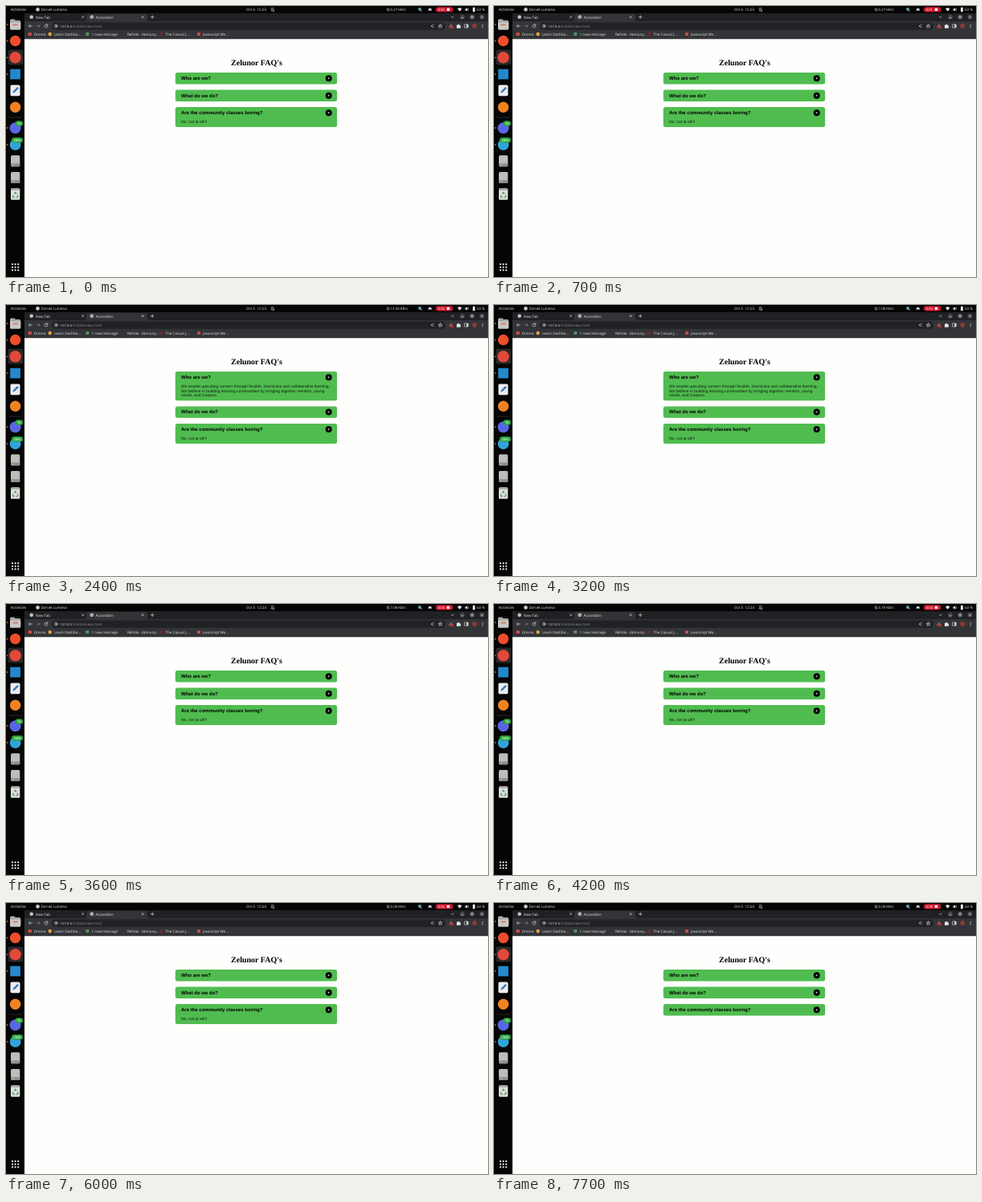
These frames come from a looping animation (600 by 338 pixels, 8 s). An HTML page:

```html
<!DOCTYPE html>
<html lang="en">
<head>
<meta charset="utf-8">
<title>Accordion</title>
<style>
  html, body { margin: 0; width: 100%; height: 100%; overflow: hidden; background: #fefefc; }
  svg { display: block; width: 600px; height: 338px; }
  text { font: 4.55px "Open Sans", "Noto Sans", sans-serif; fill: #e4e5e8; white-space: pre; text-rendering: geometricPrecision; }
  .line { fill: none; stroke: #d4d5d8; stroke-width: .7; stroke-linecap: round; stroke-linejoin: round; }
  .dim { stroke: #808185; }
  .badge { font-size: 4px; font-weight: 600; fill: #fff; text-anchor: middle; }
  .title { font: bold 10px "Liberation Serif", serif; fill: #000; text-anchor: middle; }
  .head { font: bold 6px "Liberation Sans", sans-serif; fill: #000; }
  .body { font: 5px "Liberation Sans", sans-serif; fill: #0b200b; }
</style>
</head>
<body>
<svg viewBox="0 0 600 338">
  <rect width="600" height="338" fill="#fefefc"/>

  <!-- browser frame -->
  <rect x="23" y="9" width="577" height="11" fill="#202124"/>
  <path d="M23 19H98q2 0 2-2V12q0-2 2-2h72q2 0 2 2v5q0 2 2 2H600V41.300H23z" fill="#333437"/>
  <rect x="57" y="20.500" width="490" height="9.300" rx="4.600" fill="#212225"/>
  <circle cx="31.700" cy="13.700" r="2.300" fill="#c3c4c7"/>
  <circle cx="106.700" cy="13.700" r="2.300" fill="#d4d5d8"/>
  <path class="line" stroke-width=".5" style="stroke:#55565a" d="M104.800 13h2l1 1.500M106 15.700v-1.200"/>
  <text x="37" y="15.500">New Tab</text>
  <text x="111.500" y="15.500" style="font-size:4.750px">Accordion</text>
  <path class="line" d="M94.500 12.600l2.200 2.200m0-2.200l-2.200 2.200M169.100 12.600l2.200 2.200m0-2.200l-2.200 2.200M180.300 13.700h3.800m-1.900-1.900v3.800M554.200 13.200l1.500 1.400 1.500-1.400"/>
  <g fill="#45464a"><circle cx="568" cy="13.800" r="3"/><circle cx="580.300" cy="13.800" r="3"/><circle cx="592.500" cy="13.800" r="3"/></g>
  <path class="line" d="M566.800 14.800h2.400M579.200 12.700h2.200v2.200h-2.200zM591.500 12.800l2 2m0-2l-2 2"/>

  <!-- toolbar -->
  <path class="line" d="M32.500 25h-4m1.700-1.700L28.500 25l1.700 1.700M51.700 23.900a2 2 0 1 0 .2 1.700M51.900 22.800v1.400h-1.400"/>
  <path class="line dim" d="M38 25h4m-1.700-1.700L42 25l-1.700 1.700"/>
  <g class="line" stroke-width=".5"><circle cx="62.300" cy="25" r="1.800"/><path d="M62.300 25v.9m0-1.900v.1"/></g>
  <text x="67.300" y="26.500" style="font-size:4.300px">127.0.0.1<tspan fill="#8d8f94">:5500/index.html</tspan></text>
  <path class="line" d="M532.300 23.400l-3.300 1.600 3.300 1.600"/>
  <path class="line" d="M540.600 22.700l.7 1.600 1.800.1-1.400 1.100.5 1.700-1.600-1-1.600 1 .5-1.700-1.400-1.100 1.800-.1z"/>
  <path d="M551 26.500l3-4 1.500 1.500-3.500 3z" fill="#8a6d70"/>
  <rect x="553.300" y="25" width="3.500" height="2.800" rx=".6" fill="#d32f3f"/>
  <path d="M561 23.700h1.300a.9.900 0 0 1 1.800 0h1.300v1.300a.9.900 0 0 1 0 1.800v.900h-4.400z" fill="#e4e5e8"/>
  <path class="line" d="M571.200 23h4v4h-4z"/><path d="M573.300 23h2v4h-2z" fill="#d4d5d8"/>
  <circle cx="583.200" cy="25" r="3" fill="#8b3a35"/>
  <g fill="#d4d5d8"><circle cx="593.200" cy="23.300" r=".6"/><circle cx="593.200" cy="25" r=".6"/><circle cx="593.200" cy="26.700" r=".6"/></g>

  <!-- bookmarks -->
  <rect x="27.700" y="33.300" width="4.200" height="3.600" fill="#dd4a40"/>
  <circle cx="54.700" cy="35.100" r="2.300" fill="#dca23c"/>
  <rect x="99.300" y="33" width="4" height="4" fill="#4f8f5b"/>
  <rect x="192.500" y="33.200" width="2.400" height="4" fill="#8e2430"/>
  <rect x="238" y="33.200" width="4" height="3.800" fill="#c94b43"/>
  <text x="35" y="36.800">Dremo</text>
  <text x="60" y="36.800">Learn Dashbo…</text>
  <text x="106.600" y="36.800">1 new message</text>
  <text x="151" y="36.800">RelVok - domuny…</text>
  <text x="198.500" y="36.800">The Casual J.…</text>
  <text x="245" y="36.800">Javascript We…</text>

  <!-- system bar and dock -->
  <path d="M0 0H600V9H23V338H0z" fill="#050505"/>
  <text x="5.800" y="6.200" style="font-size:4.700px">Activities</text>
  <circle cx="39.500" cy="4.400" r="2.300" fill="#c9cacb"/>
  <text x="43.500" y="6.200">Dorvel Lumena</text>
  <text id="clock" x="299" y="6.200"></text>
  <path class="line" d="M330.200 5.800h3.600q-.6-.6-.6-2.200a1.200 1.200 0 0 0-2.400 0q0 1.600-.6 2.200M331.700 6.900h.6M330 2.300l4 4.500" style="stroke-width:.5"/>
  <path class="line" d="M474.800 6.200V2.800l-.8.900M476.400 2.800v3.400l.8-.9" style="stroke-width:.6"/>
  <text id="speed" x="478.500" y="6.200" style="font-size:4.400px"></text>
  <circle cx="515" cy="4" r="2" fill="#5b9fac"/><path d="M516 5l1.700 1.600" class="line"/>
  <path d="M525.500 6.500l.8-3.500h3l.8 3.500-1.300-1h-2z" fill="#d4d5d8"/>
  <rect x="535" y="1.200" width="21.300" height="6.300" rx="3.100" fill="#cf1930"/>
  <text id="timer" x="537.700" y="5.900" style="font-size:4.200px;fill:#fff"></text>
  <rect x="548.800" y="2.700" width="3.400" height="3.400" rx=".4" fill="#fff"/>
  <path d="M562 3.500q2.700-2.300 5.400 0l-2.700 3.300z" fill="#e4e5e8"/>
  <path d="M571.500 3.600h1.200l1.500-1.400v4.600l-1.500-1.400h-1.200z" fill="#e4e5e8"/><path class="line" d="M575.300 3.200q.9 1.300 0 2.600"/>
  <path d="M581 2.200h.7v-.6h1.500v.6h.7v5H581z" fill="#e4e5e8"/>
  <text x="586" y="6.200">63 %</text>

  <rect x="2.500" y="54.500" width="18.500" height="19" rx="3" fill="#292929"/>
  <g fill="#e0562c"><circle cx="1.700" cy="23" r=".9"/><circle cx="1.700" cy="43.500" r=".9"/><circle cx="1.700" cy="64.300" r=".9"/><circle cx="1.700" cy="85" r=".9"/><circle cx="1.700" cy="152" r=".9"/><circle cx="1.700" cy="173" r=".9"/></g>
  <path d="M5 18q0-1.500 1.500-1.500h4l1.200 1.500h5q1.500 0 1.500 1.500V28q0 1.500-1.500 1.500H6.500Q5 29.500 5 28z" fill="#a9a9a7"/>
  <path d="M5 20.500h13.200V28q0 1.500-1.500 1.500H6.500Q5 29.500 5 28z" fill="#c8c8c5"/>
  <path d="M8.500 23.500h6.300" stroke="#d96a5b" stroke-width="1.500"/>
  <circle cx="11.600" cy="43.500" r="6.700" fill="#ee4d2b"/>
  <circle cx="11.600" cy="64.300" r="7.200" fill="#e3493b"/>
  <rect x="5.200" y="78.700" width="12.700" height="12.700" fill="#2489cc"/>
  <rect x="5.500" y="98.500" width="12" height="13.700" rx="1.600" fill="#eeeef0"/>
  <path d="M8.300 108.500l.8-2.500 5-5 1.700 1.700-5 5z" fill="#3878c4"/>
  <circle cx="11.600" cy="126.300" r="6.700" fill="#f08321"/>
  <path d="M4 139h15.500" stroke="#3c3c3c" stroke-width=".6"/>
  <circle cx="11.600" cy="152.300" r="7" fill="#5966e3"/>
  <circle cx="11.600" cy="173" r="6.900" fill="#30a3db"/>
  <rect x="11.500" y="143.200" width="9.500" height="6.600" rx="3.300" fill="#27a63a"/>
  <rect x="7" y="164" width="14" height="6.600" rx="3.300" fill="#27a63a"/>
  <text class="badge" x="16.200" y="148">76</text>
  <text class="badge" x="14" y="168.800">2935</text>
  <g id="drive">
    <rect x="6" y="186.300" width="11.300" height="14" rx="1.500" fill="#bcbcba"/>
    <path d="M6 196.500h11.300v2.300q0 1.500-1.500 1.500H7.500q-1.500 0-1.500-1.500z" fill="#8d8d8b"/>
    <path d="M8 198.400h2" stroke="#d8d8d5" stroke-width=".7"/>
  </g>
  <use href="#drive" y="20.700"/>
  <rect x="6" y="227.500" width="11.300" height="14.200" rx="1.500" fill="#dededb"/>
  <path d="M6 229q0-1.500 1.500-1.500h8.300q1.500 0 1.500 1.500v1H6z" fill="#aeb0ad"/>
  <path d="M10.400 234.300l1.300-1.800 1.300 1.800M14 235.800l.9 1.700-1 1.200h-1.500M10.900 238.700H9.300l-.9-1.300.9-1.500" fill="none" stroke="#389657" stroke-width="1.100"/>
  <g id="apps" fill="#f0f0f0"></g>

  <!-- page -->
  <text class="title" x="312" y="73.600">Zelunor FAQ's</text>
  <g id="accordion"></g>
</svg>
<script>
const LOOP = 8000, LINE = 5.625, CLOSED = 14.4, PITCH = 21.5, TOP = 83;
const $ = id => document.getElementById(id);

const panels = [
  { title: "Who are we?", open: t => t >= 2400 && t < 3600, lines: [
    "We enable upscaling careers through flexible, interactive and collaborative learning.",
    "We believe in building learning communities by bringing together mentors, young",
    "minds, and creators."] },
  { title: "What do we do?", open: t => t >= 4800 && t < 6000, lines: [
    "Building learning communities with Our Affordable & Competent Courses"] },
  { title: "Are the community classes boring?", open: t => t < 7200, lines: ["No, not at all!!!"] }
];

const speeds = [[0, "0.27"], [1200, "13.58"], [3200, "7.08"], [4200, "5.70"], [5200, "0.00"]];

$("accordion").innerHTML = panels.map(({ title, lines }) => `<g>
  <rect x="210.800" width="201.300" rx="2.500" fill="#50bc50"/>
  <text class="head" x="218" y="9.100">${title}</text>
  <circle cx="401.700" cy="7.200" r="4" fill="#000"/>
  <path d="M400.600 7.200h2.200m-1.100-1.100v2.200" stroke="#fff" stroke-width=".6"/>
  <g>${lines.map((s, i) =>
    `<text class="body" x="218" y="${20 + i * LINE}">${s.replace("&", "&amp;")}</text>`).join("")}</g>
</g>`).join("");
panels.forEach((p, i) => p.node = $("accordion").children[i]);

for (let i = 0; i < 9; i++)
  $("apps").innerHTML += `<circle cx="${8 + i % 3 * 3.6}" cy="${322.2 + Math.floor(i / 3) * 3.6}" r="1.1"/>`;

function draw() {
  const t = performance.now() % LOOP;
  let y = TOP;
  for (const { node, open, lines } of panels) {
    const isOpen = open(t), extra = isOpen ? 5 + lines.length * LINE : 0;
    node.setAttribute("transform", `translate(0 ${y})`);
    node.firstElementChild.setAttribute("height", CLOSED + extra);
    node.lastElementChild.style.display = isOpen ? "" : "none";
    y += PITCH + extra;
  }
  $("clock").textContent = `Oct 5  12:${t < 5700 ? 25 : 26}`;
  $("speed").textContent = speeds.findLast(([start]) => t >= start)[1] + " KB/s";
  $("timer").textContent = `0:0${Math.floor((t + 300) / 1000)}`;
  requestAnimationFrame(draw);
}
draw();
</script>
</body>
</html>
```
